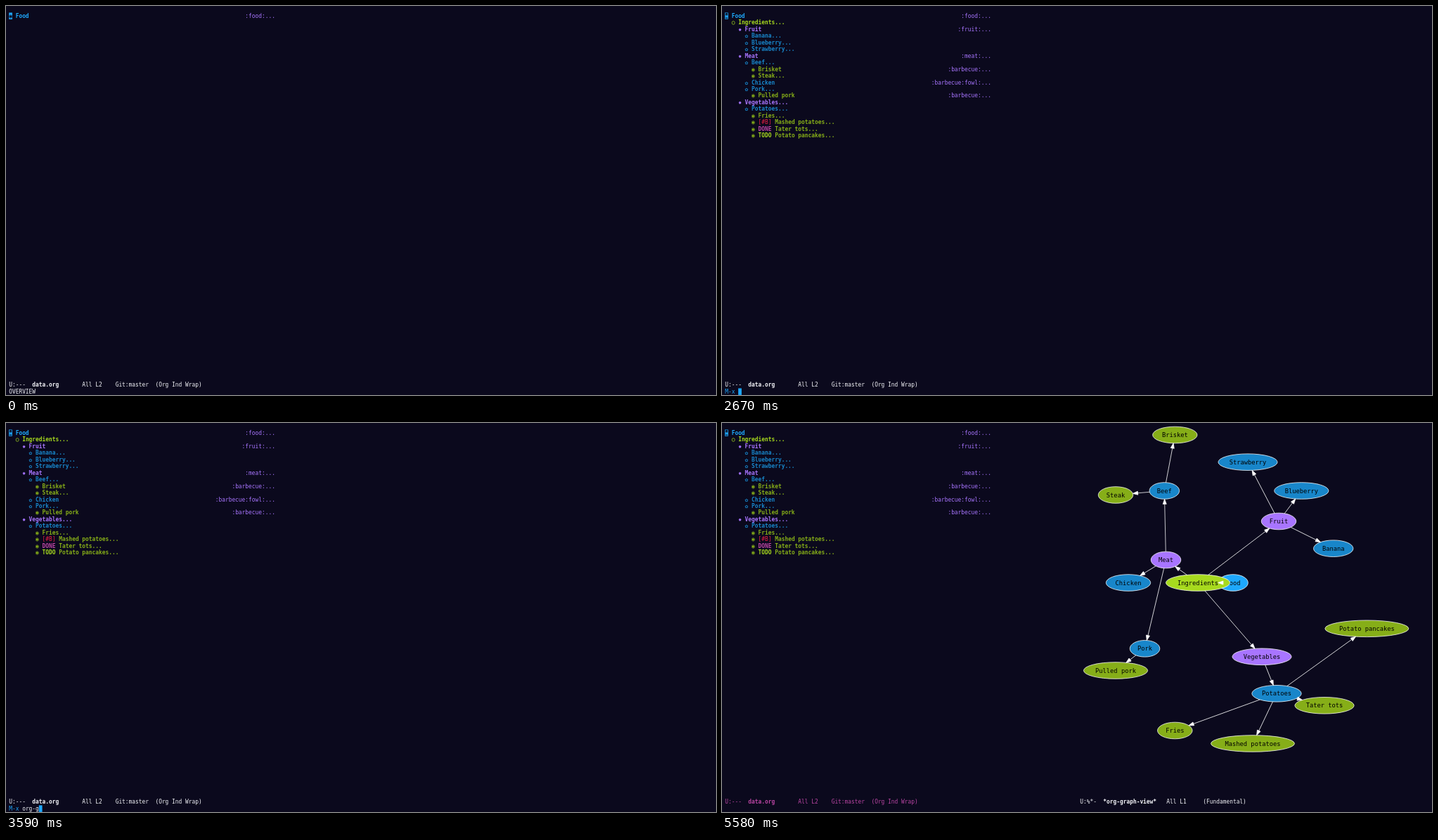
An HTML page with a canvas that plays this animation: 1010 px wide and 554 px high, repeating every 8000 ms.

```html
<!DOCTYPE html>
<html lang="en">
<head>
<meta charset="utf-8">
<title>Outline and graph view</title>
<style>
html, body { margin: 0; width: 100%; height: 100%; overflow: hidden; background: #0b091d; }
canvas { display: block; }
</style>
</head>
<body>
<canvas id="stage" width="1010" height="554"></canvas>
<script>
const ctx = document.getElementById('stage').getContext('2d');
const SCALE = 1010 / 1920, LOOP = 8000;
const CELL = 9, LINE = 18, LEFT = 8, TOP = 18, RIGHT = 968;
const BG = '#0b091d', FG = '#f2f3f7', BLUE = '#1ea8fc', GREEN = '#a7da1e',
  PURPLE = '#a875ff', PINK = '#ba45a3', RED = '#e61f44';
const COLORS = [BLUE, GREEN, PURPLE, '#1886ca', '#86ae18'];
const BULLETS = '◉○✸✿◉';

// level, title, tags, graph x, graph y, keyword, keyword colour
const items = [
  [0, 'Food', ':food:', 727, 227.5],
  [1, 'Ingredients', '', 677, 227.5],
  [2, 'Fruit', ':fruit:', 792, 140],
  [3, 'Banana', '', 869.7, 178.7],
  [3, 'Blueberry', '', 824.3, 96.5],
  [3, 'Strawberry', '', 748, 55.7],
  [2, 'Meat', ':meat:', 631.5, 195],
  [3, 'Beef', '', 629.3, 96.5],
  [4, 'Brisket', ':barbecue:', 644.3, 17],
  [4, 'Steak', '', 560, 102.5],
  [3, 'Chicken', ':barbecue:fowl:', 578, 227.5],
  [3, 'Pork', '', 601.5, 321.3],
  [4, 'Pulled pork', ':barbecue:', 560, 352.5],
  [2, 'Vegetables', '', 768, 332.8],
  [3, 'Potatoes', '', 789, 385.3],
  [4, 'Fries', '', 644.3, 438],
  [4, 'Mashed potatoes', '', 755, 456.5, '[#B]', RED],
  [4, 'Tater tots', '', 857, 402.3, 'DONE', PINK],
  [4, 'Potato pancakes', '', 917.3, 292.8, 'TODO', GREEN],
].map(([level, title, tags, x, y, word, wordColor]) =>
  ({ level, title, tags, x, y, word, wordColor, rx: 7.4 + 3.47 * title.length, ry: 11.8 }));

items.forEach((item, i) => {
  item.parent = items.slice(0, i).reverse().find(p => p.level === item.level - 1);
});

const echoes = [
  [0, 'OVERVIEW'], [1660, 'CONTENTS...done'], [2670, ''],
  [3180, 'o'], [3250, 'or'], [3320, 'org'], [3510, 'org-'], [3590, 'org-g'], [4030, 'org-gr'],
  [4280, 'org-graph-view-'], [4960, 'org-graph-view-g'], [5050, 'org-graph-view-gr'],
  [5140, 'org-graph-view-graphviz'], [5580, ''],
];

function setFont(size, bold) {
  ctx.font = `${bold ? 'bold ' : ''}${size}px "DejaVu Sans Mono", monospace`;
}

function put(text, col, top, color, bold = false, left = LEFT) {
  setFont(14.95, bold);
  ctx.fillStyle = color;
  ctx.fillText(text, left + col * CELL, top + 14);
}

function block(col, top) {
  ctx.fillStyle = BLUE;
  ctx.fillRect(LEFT + col * CELL, top, CELL, LINE);
}

function drawOutline(count, cursor) {
  items.slice(0, count).forEach((item, row) => {
    const { level, title, tags, word, wordColor } = item;
    const top = TOP + row * LINE, color = COLORS[level];
    const solid = row === 0 && cursor === 'solid';
    let col = level * 2;
    if (solid) block(0, top);
    put(BULLETS[level], col, top, solid ? BG : color, true);
    col += 2;
    if (word) {
      put(word, col, top, wordColor, word[0] !== '[');
      col += word.length + 1;
    }
    put(title + (tags ? '' : '...'), col, top, color, true);
    if (tags) put(tags + '...', 77 - tags.length, top, PURPLE);
  });
  if (cursor === 'hollow') {
    ctx.strokeStyle = BLUE;
    ctx.lineWidth = 1.4;
    ctx.strokeRect(LEFT + .7, TOP + .7, CELL - 1.4, LINE - 1.4);
  }
}

function drawModeline(left, color, flags, name, rest) {
  const top = 1017;
  put(flags, 0, top, color, false, left);
  put(name, 7, top, color, true, left);
  put(rest, 7 + name.length, top, color, false, left);
}

function drawEcho(t) {
  const text = echoes.findLast(([start]) => t >= start)[1], top = 1035;
  const typing = t >= 2670 && t < 5580;
  if (typing) {
    put('M-x', 0, top, BLUE);
    block(4 + text.length, top);
  }
  put(text, typing ? 4 : 0, top, FG);
}

function drawNode({ x, y, rx, ry, title, level }) {
  ctx.beginPath();
  ctx.ellipse(x, y, rx, ry, 0, 0, 2 * Math.PI);
  ctx.fillStyle = COLORS[level];
  ctx.fill();
  ctx.stroke();
  ctx.save();
  ctx.translate(x, y + 3.1);
  ctx.scale(SCALE, SCALE);
  setFont(16.6);
  ctx.textAlign = 'center';
  ctx.fillStyle = '#000';
  ctx.fillText(title, 0, 0);
  ctx.restore();
}

function drawEdge(from, to) {
  const dx = to.x - from.x, dy = to.y - from.y, length = Math.hypot(dx, dy);
  const edge = n => length / Math.hypot(dx / n.rx, dy / n.ry);
  const start = edge(from), tip = Math.max(length - edge(to), start);
  ctx.save();
  ctx.translate(from.x, from.y);
  ctx.rotate(Math.atan2(dy, dx));
  ctx.beginPath();
  ctx.moveTo(start, 0);
  ctx.lineTo(Math.max(start, tip - 7), 0);
  ctx.stroke();
  ctx.beginPath();
  ctx.moveTo(tip, 0);
  ctx.lineTo(tip - 7.2, -2.5);
  ctx.lineTo(tip - 7.2, 2.5);
  ctx.closePath();
  ctx.fillStyle = '#fff';
  ctx.fill();
  ctx.stroke();
  ctx.restore();
}

function drawGraph() {
  ctx.strokeStyle = '#fff';
  ctx.lineWidth = .75;
  items.forEach(drawNode);
  items.slice(1).forEach(item => drawEdge(item.parent, item));
}

function draw(t) {
  const graph = t >= 5580;
  ctx.setTransform(1, 0, 0, 1, 0, 0);
  ctx.fillStyle = BG;
  ctx.fillRect(0, 0, 1010, 554);
  if (graph) drawGraph();
  ctx.scale(SCALE, SCALE);
  drawOutline(t < 1660 ? 1 : items.length, t < 1000 ? 'solid' : t < 2670 ? 'none' : 'hollow');
  drawModeline(LEFT, graph ? PINK : FG, 'U:---', 'data.org',
    '       All L2    Git:master  (Org Ind Wrap)');
  if (graph) drawModeline(RIGHT, FG, 'U:%*-', '*org-graph-view*', '   All L1     (Fundamental)');
  drawEcho(t);
}

const begin = performance.now();
function tick() {
  draw((performance.now() - begin) % LOOP);
  requestAnimationFrame(tick);
}
tick();
</script>
</body>
</html>
```
